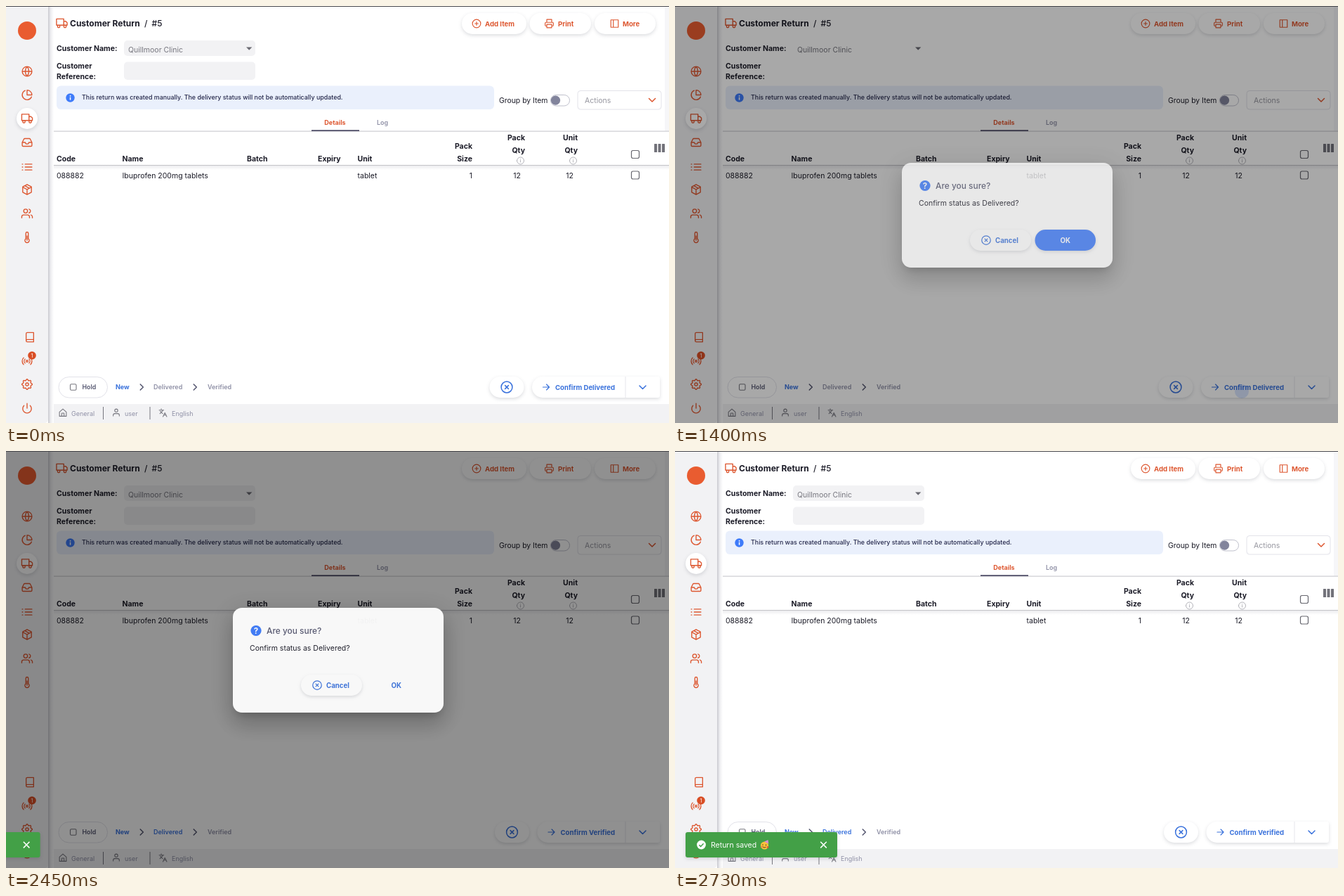
An HTML page that plays this animation: 944 px wide and 593 px high, repeating every 3.5 s.

```html
<!DOCTYPE html>
<html lang="en">
<head>
<meta charset="utf-8">
<title>Customer Return</title>
<style>
  html, body { margin: 0; width: 100%; height: 100%; overflow: hidden; background: #fff; }
  svg, #backdrop, #dialog { position: absolute; left: 0; top: 0; }
  svg { width: 944px; height: 593px; display: block; }
  text { font-family: Inter, "Open Sans", sans-serif; }
  #backdrop { width: 944px; height: 593px; background: rgba(0, 0, 0, .46); }
  #dialog { width: 944px; height: 593px; }
  #paper {
    position: absolute; left: 323px; top: 222.5px; width: 299.5px; height: 149.5px;
    border-radius: 13px; background: #fff;
    box-shadow: 0 8px 11px -5px rgba(0,0,0,.2), 0 18px 28px 2px rgba(0,0,0,.14), 0 7px 34px 6px rgba(0,0,0,.12);
  }
  .lift { filter: drop-shadow(0 2px 2.5px rgba(40, 41, 61, .16)); }
</style>
</head>
<body>
<svg id="page" viewBox="0 0 944 593"></svg>
<div id="backdrop"></div>
<div id="dialog"><div id="paper"></div><svg id="ask" viewBox="0 0 944 593"></svg></div>
<svg id="top" viewBox="0 0 944 593"></svg>

<script>
const LOOP = 3500, STEP = 70;
const ORANGE = '#dd5730', BLUE = '#3e7bfa', LINK = '#3a72dc', INK = '#1c1c28',
      GREY = '#8f90a6', SLATE = '#555770', PALE = '#f2f2f4';
const $ = id => document.getElementById(id);

// Line icons on a 24 unit grid
const ring = (x, y, r) => `M${x - r} ${y}a${r} ${r} 0 1 0 ${2 * r} 0a${r} ${r} 0 1 0 ${-2 * r} 0`;
const gear = () => {
  let d = '';
  for (let i = 0; i < 96; i++) {
    const a = i * Math.PI / 48, r = 9.4 + 1.3 * Math.cos(8 * a);
    d += `${i ? 'L' : 'M'}${(12 + r * Math.cos(a)).toFixed(2)} ${(12 + r * Math.sin(a)).toFixed(2)}`;
  }
  return d + 'Z' + ring(12, 12, 3);
};
const ICONS = {
  globe: ring(12, 12, 10) + 'M2 12h20M12 2a15 15 0 0 1 0 20a15 15 0 0 1 0-20',
  pie: 'M21.2 15.9A10 10 0 1 1 8 2.8M22 12A10 10 0 0 0 12 2v10z',
  truck: 'M1 3h15v13H1zM16 8h4l3 3v5h-7z' + ring(5.5, 18.5, 2.5) + ring(18.5, 18.5, 2.5),
  inbox: 'M22 12h-6l-2 3h-4l-2-3H2M5.5 5.1L2 12v6a2 2 0 0 0 2 2h16a2 2 0 0 0 2-2v-6l-3.5-6.9A2 2 0 0 0 16.8 4H7.2a2 2 0 0 0-1.7 1.1z',
  list: 'M8 6h14M8 12h14M8 18h14M2 6h1M2 12h1M2 18h1',
  box: 'M12 1.5l9 5v11l-9 5l-9-5v-11zM3.3 7l8.7 5l8.7-5M12 22V12M7.5 4.2l9 5.2',
  users: 'M17 21v-2a4 4 0 0 0-4-4H5a4 4 0 0 0-4 4v2M23 21v-2a4 4 0 0 0-3-3.9M16 3.1a4 4 0 0 1 0 7.8' + ring(9, 7, 4),
  heat: 'M14.5 14.8V3.5a2.5 2.5 0 0 0-5 0v11.3a4.5 4.5 0 1 0 5 0zM12 9v9',
  book: 'M4 19.5A2.5 2.5 0 0 1 6.5 17H20M6.5 2H20v20H6.5A2.5 2.5 0 0 1 4 19.5v-15A2.5 2.5 0 0 1 6.5 2z',
  radio: ring(12, 12, 2) + 'M16.2 7.8a6 6 0 0 1 0 8.4M7.8 16.2a6 6 0 0 1 0-8.4M19.1 4.9a10 10 0 0 1 0 14.2M4.9 19.1a10 10 0 0 1 0-14.2',
  gear: gear(),
  power: 'M18.4 6.6a9 9 0 1 1-12.8 0M12 2v10',
  plus: ring(12, 12, 10) + 'M12 8v8M8 12h8',
  print: 'M6 9V2h12v7M6 18H4a2 2 0 0 1-2-2v-5a2 2 0 0 1 2-2h16a2 2 0 0 1 2 2v5a2 2 0 0 1-2 2h-2M6 14h12v8H6z',
  panel: 'M3 3h18v18H3zM9 3v18',
  cross: ring(12, 12, 10) + 'M15 9l-6 6M9 9l6 6',
  arrow: 'M4 12h16M13 5l7 7l-7 7',
  home: 'M3 10l9-8l9 8v11H3zM9 21v-8h6v8',
  user: 'M20 21v-2a4 4 0 0 0-4-4H8a4 4 0 0 0-4 4v2' + ring(12, 7, 4),
  lang: 'M5 8l6 6M4 14l6-6l2-3M2 5h12M7 2h1M22 22l-5-10l-5 10M14 18h6',
  down: 'M3 8l9 9l9-9',
  right: 'M9 5l7 7l-7 7',
  info: ring(12, 12, 10) + 'M12 16v-5M12 8v-.5'
};

// Shape helpers
const icon = (name, x, y, size = 17, color = ORANGE, weight = 2) =>
  `<path d="${ICONS[name]}" transform="translate(${x - size / 2} ${y - size / 2}) scale(${size / 24})"
    fill="none" stroke="${color}" stroke-width="${weight}" stroke-linecap="round" stroke-linejoin="round"/>`;
const text = (s, x, y, size = 10.5, weight = 400, color = INK, anchor = 'start') =>
  `<text x="${x}" y="${y}" font-size="${size}" font-weight="${weight}" fill="${color}" text-anchor="${anchor}">${s}</text>`;
const rect = (x, y, w, h, fill, rx = 0, more = '') =>
  `<rect x="${x}" y="${y}" width="${w}" height="${h}" rx="${rx}" fill="${fill}" ${more}/>`;
const disc = (x, y, r, fill, more = '') => `<circle cx="${x}" cy="${y}" r="${r}" fill="${fill}" ${more}/>`;
const group = (id, body) => `<g id="${id}">${body}</g>`;
const pill = (x, y, w) => rect(x, y, w, 30, '#fff', 15, 'class="lift"');
const line = (c, w = 1) => `stroke="${c}" stroke-width="${w}"`;

function sidebar() {
  const items = [['globe', 93], ['pie', 126.5], ['truck', 160], ['inbox', 194], ['list', 229],
    ['box', 261], ['users', 295], ['heat', 329], ['radio', 505], ['gear', 538], ['power', 572]];
  return rect(60, 1, 8, 592, 'url(#edge)') +
    `<path d="M0 0H54Q60 0 60 6V587Q60 593 54 593H0Z" fill="${PALE}"/>` +
    disc(30, 35, 13, '#e95c30') +
    disc(30, 160, 15, '#fff', 'class="lift"') +
    items.map(([name, y]) => icon(name, 30, y, 16.5)).join('') +
    icon('book', 34, 471, 16) +
    disc(37, 497, 5.8, '#d94e25') + text('1', 37, 500, 7.5, 400, '#fff', 'middle');
}

function header() {
  const buttons = [['Add Item', 'plus', 649, 92, 670, 682], ['Print', 'print', 745.5, 87.5, 773.5, 786],
    ['More', 'panel', 838, 87, 866.5, 878]];
  return rect(938, 1, 6, 177, '#f6f6f8') +
    icon('truck', 79.5, 24.5, 16.5) +
    text('Customer Return', 91, 28.5, 12, 700) + text('/', 197, 28.5, 12, 500) + text('#5', 207.5, 28.5, 12, 500) +
    buttons.map(([label, name, x, w, ix, tx]) =>
      pill(x, 10, w) + icon(name, ix, 25, 14) + text(label, tx, 28.5, 9.6, 700, ORANGE)).join('') +
    text('Customer Name:', 72, 64, 10.5, 700) +
    text('Customer', 72, 88.5, 10.5, 700) + text('Reference:', 72, 103.5, 10.5, 700) +
    group('fields', rect(168, 49, 187, 22, PALE, 5) + rect(168, 79.5, 187, 25.5, PALE, 5)) +
    text('Quillmoor Clinic', 174, 65.5, 10.5, 400, '#77777f') +
    '<path d="M342 58.5h8.4l-4.2 4.2z" fill="#6c6c74"/>' +
    rect(72, 113.5, 623, 33.5, '#eaf0fc', 6) +
    disc(91.5, 130.5, 6.2, BLUE) + rect(90.8, 129.7, 1.5, 4, '#fff') + rect(90.8, 127, 1.5, 1.6, '#fff') +
    text('This return was created manually. The delivery status will not be automatically updated.', 108, 133.3, 8.9, 500, '#25284b') +
    text('Group by Item', 702, 138, 10.4) +
    rect(775.5, 126.5, 27, 15.5, '#fff', 7.7, line('#bfc0cc')) + disc(782.5, 134.2, 6.6, '#82849c') +
    rect(814, 120.5, 119, 26.5, '#fff', 4, line('#e2e2e9')) +
    text('Actions', 824, 138, 10.5, 400, '#96969f') + icon('down', 920, 133.5, 12, ORANGE, 3) +
    text('Details', 468.5, 169.3, 9, 700, ORANGE, 'middle') + text('Log', 536, 169.3, 9, 600, GREY, 'middle');
}

function table() {
  const heads = [['Code', 72], ['Name', 165.5], ['Batch', 343], ['Expiry', 444], ['Unit', 500.5]];
  const ends = [['Pack', 664, 203], ['Size', 664, 221], ['Pack', 739, 191], ['Qty', 739, 209],
    ['Unit', 814, 191], ['Qty', 814, 209]];
  const box = y => rect(890.5, y, 11, 11, '#fff', 2.2, line('#686870', 1.2));
  return rect(60, 178, 884, 48, '#fff') + rect(60, 177.6, 884, 1, '#c4c4c8') +
    rect(435, 176.3, 68, 1.7, '#4b4964') +
    rect(62, 227, 882, 6, 'url(#under)') + rect(60, 226, 884, 1, '#c4c4c8') +
    heads.map(([s, x]) => text(s, x, 221, 10.5, 700)).join('') +
    ends.map(([s, x, y]) => text(s, x, y, 10.5, 700, INK, 'end')).join('') +
    icon('info', 732.5, 220, 12, '#9a9aa2', 1.5) + icon('info', 807.5, 220, 12, '#9a9aa2', 1.5) +
    box(205.5) + box(235) +
    [923, 928.5, 934].map(x => rect(x, 196, 4, 12, '#72727a', .5)).join('') +
    text('088882', 72, 245) + text('Ibuprofen 200mg tablets', 165.5, 245) + text('tablet', 500.5, 245) +
    text('1', 664, 245, 10.5, 400, INK, 'end') + text('12', 733, 245, 10.5, 400, INK, 'end') +
    text('12', 808, 245, 10.5, 400, INK, 'end');
}

// Status button with its cancel button; x is the left end of the status button
function actions(x, label) {
  const left = `M${x + 15} 527H882V557H${x + 15}a15 15 0 0 1 0-30z`;
  const face = c => icon('arrow', x + 20, 542, 13.5, c, 2.2) + text(label, x + 33, 546, 9.6, 700, c);
  return pill(x - 60.5, 527, 49) + icon('cross', x - 36, 542, 19, LINK, 1.9) +
    `<path class="lift" d="M${x + 15} 527H928a3 3 0 0 1 3 3V554a3 3 0 0 1-3 3H${x + 15}a15 15 0 0 1 0-30z" fill="#fff"/>` +
    rect(881.5, 527, 1, 30, '#e6e6ec') + icon('down', 906.5, 542, 12, LINK, 3) + face(LINK) +
    `<g class="hot"><path d="${left}" fill="${BLUE}"/>${face('#fff')}</g>`;
}

function footer() {
  return rect(75, 527.5, 69.5, 29.5, '#fff', 14.7, line('#e2e2e9')) +
    rect(91.5, 537.7, 8.5, 8.5, '#fff', 1.5, line('#77777f', 1.1)) +
    text('Hold', 108.5, 545.3, 8.8, 600, SLATE) +
    text('New', 156, 545.3, 9, 700, LINK) + icon('right', 193, 542, 14, SLATE, 2.6) +
    `<g id="delivered">${text('Delivered', 210, 545.3, 9, 600, 'currentColor')}</g>` +
    icon('right', 269, 542, 14, SLATE, 2.6) + text('Verified', 287, 545.3, 9, 600, GREY) +
    group('before', actions(749, 'Confirm Delivered')) + group('after', actions(756.5, 'Confirm Verified')) +
    disc(807, 548, 10, '#3e7bfa', 'id="ripple" opacity=".2"') +
    rect(60, 566, 884, 27, PALE) +
    icon('home', 81, 578.5, 13, '#77777f') + text('General', 93, 582.5, 9, 400, GREY) +
    rect(138, 570, 1, 18, '#77777f') +
    icon('user', 157, 578, 13, '#77777f') + text('user', 169, 582.5, 9, 400, GREY) +
    rect(204.5, 570, 1, 18, '#77777f') +
    icon('lang', 223.5, 578.5, 13, '#77777f') + text('English', 236, 582.5, 9, 400, GREY);
}

function question() {
  return disc(356, 255.5, 7.6, BLUE) + text('?', 356, 259.6, 11.5, 700, '#fff', 'middle') +
    text('Are you sure?', 371, 260, 11.9, 500, SLATE) +
    text('Confirm status as Delivered?', 347, 284, 10.5, 400, INK) +
    pill(420, 318, 87) + icon('cross', 443, 333, 15, LINK) + text('Cancel', 456, 336.5, 9.7, 700, LINK) +
    rect(512.5, 318, 86.5, 30, BLUE, 15, 'id="ok" class="lift"') +
    `<g id="okText">${text('OK', 555.7, 336.5, 9.7, 700, 'currentColor', 'middle')}</g>`;
}

function toast() {
  const party = disc(127.5, 561, 5.6, '#fbc23c') + '<path d="M127 555.5l5.5-2.5l.8 5.5z" fill="#d98ad0"/>' +
    disc(125, 560, .8, '#5d4020') + disc(129.5, 560.4, .8, '#5d4020') +
    '<path d="M124.5 562.6q2.5 2.6 5 .6" fill="none" stroke="#5d4020"/>' +
    disc(123.2, 563, 1.3, '#f08a4b') + disc(132, 563.4, 1.3, '#e5533d');
  return rect(15, 542, 216, 36, '#43a047', 3, 'class="lift"') +
    disc(37.5, 560, 6.4, '#fff') +
    '<path d="M34.4 560.2l2.2 2.2l4-4.2" fill="none" stroke="#43a047" stroke-width="1.5"/>' +
    text('Return saved', 51, 564, 10.5, 400, '#fff') + party +
    '<path d="M207.2 555.8l8.6 8.6M215.8 555.8l-8.6 8.6" stroke="#fff" stroke-width="1.5"/>';
}

$('page').innerHTML = `<defs>
  <linearGradient id="edge"><stop offset="0" stop-color="#c9c9cf"/><stop offset=".45" stop-color="#ededf0"/><stop offset="1" stop-color="#fff"/></linearGradient>
  <linearGradient id="under" x2="0" y2="1"><stop offset="0" stop-color="#ececef"/><stop offset="1" stop-color="#fff"/></linearGradient>
  </defs>` + rect(0, 0, 944, 593, '#fff') + header() + table() + footer() + sidebar();
$('ask').innerHTML = question();
$('top').innerHTML = group('toast', toast()) + rect(0, 0, 944, 1, '#48484c');

// Cubic Bezier easing, solved for time by bisection
const clamp = v => Math.min(1, Math.max(0, v));
const bezier = (x1, y1, x2, y2) => p => {
  p = clamp(p);
  if (p === 0 || p === 1) return p;
  const at = (a, b, s) => 3 * a * s * (1 - s) ** 2 + 3 * b * s * s * (1 - s) + s ** 3;
  let lo = 0, hi = 1;
  for (let i = 0; i < 24; i++) {
    const mid = (lo + hi) / 2;
    if (at(x1, x2, mid) < p) lo = mid; else hi = mid;
  }
  return at(y1, y2, lo);
};
const easeInOut = bezier(.4, 0, .2, 1), easeOut = bezier(0, 0, .2, 1);
const show = (el, on) => { el.style.display = on ? '' : 'none'; };
const hot = document.querySelectorAll('.hot');

function draw(ms) {
  const t = Math.floor(ms % LOOP / STEP) * STEP;
  const within = (a, b) => t >= a && t < b;

  const fade = easeInOut((t - 1293) / 225) * (1 - easeInOut((t - 2423) / 195));
  $('backdrop').style.opacity = $('dialog').style.opacity = fade;
  show($('dialog'), fade > 0);

  hot.forEach(el => show(el, within(1330, 1400)));
  show($('ripple'), within(1400, 1470));
  show($('fields'), !within(1400, 2240));

  const solid = 1 - clamp((t - 2170) / 210);
  $('ok').setAttribute('opacity', solid);
  $('okText').style.color = solid > .5 ? '#fff' : LINK;

  const saved = t >= 2450;
  show($('before'), !saved);
  show($('after'), saved);
  $('delivered').style.color = saved ? LINK : GREY;
  $('delivered').setAttribute('font-weight', saved ? 700 : 600);

  const slide = easeOut((t - 2437) / 207);
  show($('toast'), slide > 0);
  $('toast').setAttribute('transform', `translate(${-231 * (1 - slide)} 0)`);
}

const start = performance.now();
function tick() {
  draw(performance.now() - start);
  requestAnimationFrame(tick);
}
tick();
</script>
</body>
</html>
```
